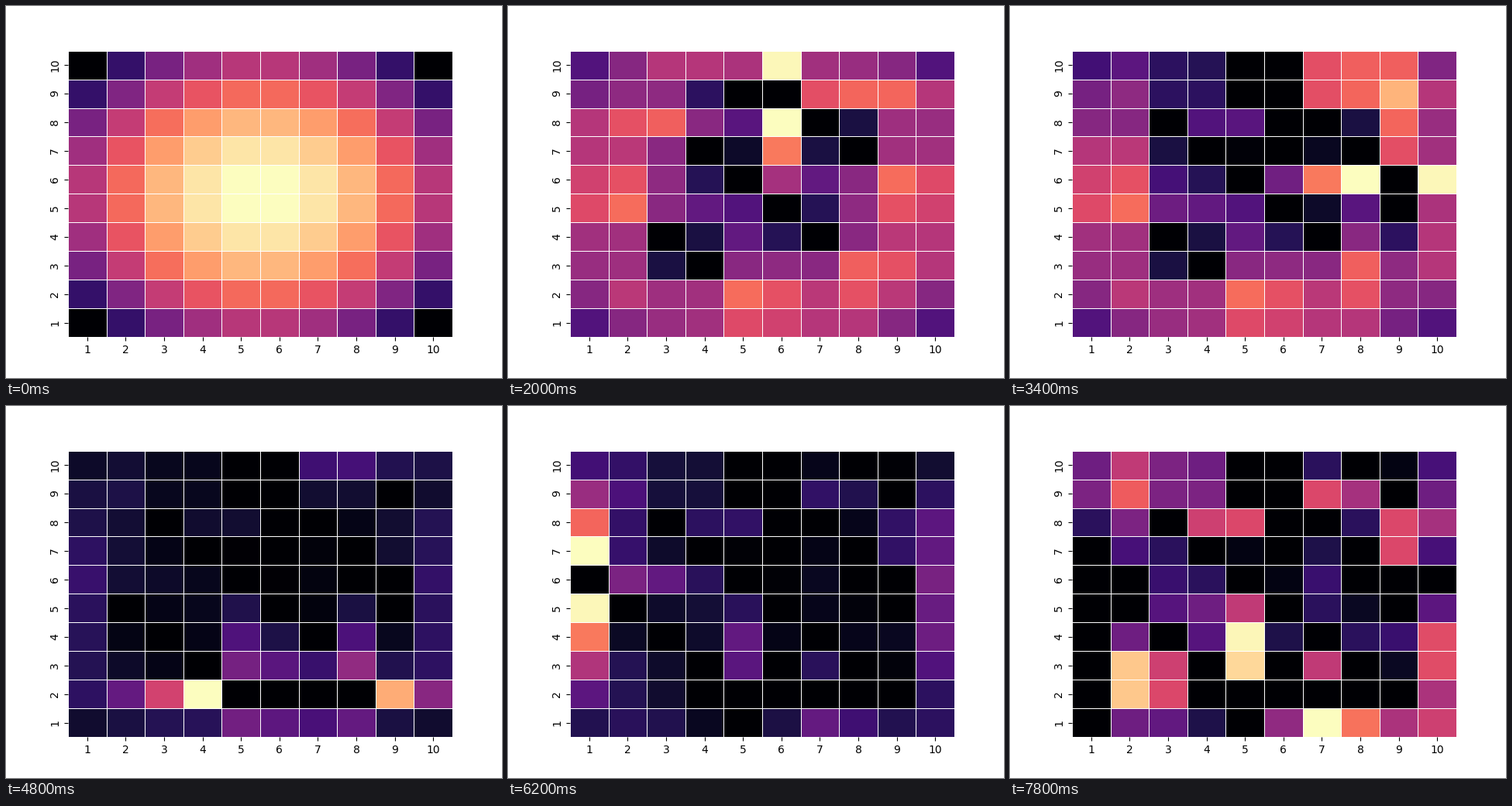
These frames come from a looping animation (640 px wide and 480 px high, 8 s). A matplotlib script:

```python
import numpy as np
import matplotlib.pyplot as plt
from matplotlib.animation import FuncAnimation

SIZE = 10
FRAMES = 40
SHIPS = (5, 4, 3, 3, 2)


def make_fleet():
    """Boolean board of ship cells; row 0 is the top row (labelled 10)."""
    fleet = np.zeros((SIZE, SIZE), bool)
    fleet[4:9, 0] = True
    fleet[8, 4:8] = True
    fleet[0:3, 5] = True
    fleet[2:5, 8] = True
    fleet[1:3, 1] = True
    return fleet


def add_line_scores(score, hits, misses):
    """Add the weight of every horizontal placement to the cells it covers."""
    for length in SHIPS:
        for row in range(SIZE):
            for start in range(SIZE - length + 1):
                span = slice(start, start + length)
                if misses[row, span].any():
                    continue
                touched = hits[row, span].sum()
                score[row, span] += length * max(1, 4 * touched)


def density(hits, misses):
    score = np.zeros((SIZE, SIZE), int)
    add_line_scores(score, hits, misses)
    add_line_scores(score.T, hits.T, misses.T)
    score[hits | misses] = 0
    return score


def play(turns):
    """Always fire at the best cell; return the density before each shot."""
    fleet = make_fleet()
    hits = np.zeros_like(fleet)
    misses = np.zeros_like(fleet)
    boards = []
    for _ in range(turns):
        board = density(hits, misses)
        boards.append(board)
        cell = np.unravel_index(board.argmax(), board.shape)
        (hits if fleet[cell] else misses)[cell] = True
    return boards


boards = play(FRAMES)

fig, ax = plt.subplots(figsize=(6.4, 4.8), dpi=100)
mesh = ax.pcolormesh(boards[0], cmap="magma", linewidths=0.5, edgecolor="white")
ax.set(xlim=(0, SIZE), ylim=(SIZE, 0))
ax.spines[:].set_visible(False)

centres = np.arange(SIZE) + 0.5
ax.set_xticks(centres, [str(n) for n in range(1, SIZE + 1)])
ax.set_yticks(centres, [str(n) for n in range(SIZE, 0, -1)],
              rotation="vertical", va="center")


def update(i):
    board = boards[i]
    mesh.set_array(board)
    mesh.set_clim(board.min(), board.max())
    return (mesh,)


anim = FuncAnimation(fig, update, frames=FRAMES, interval=200, repeat=True)
plt.show()
```
